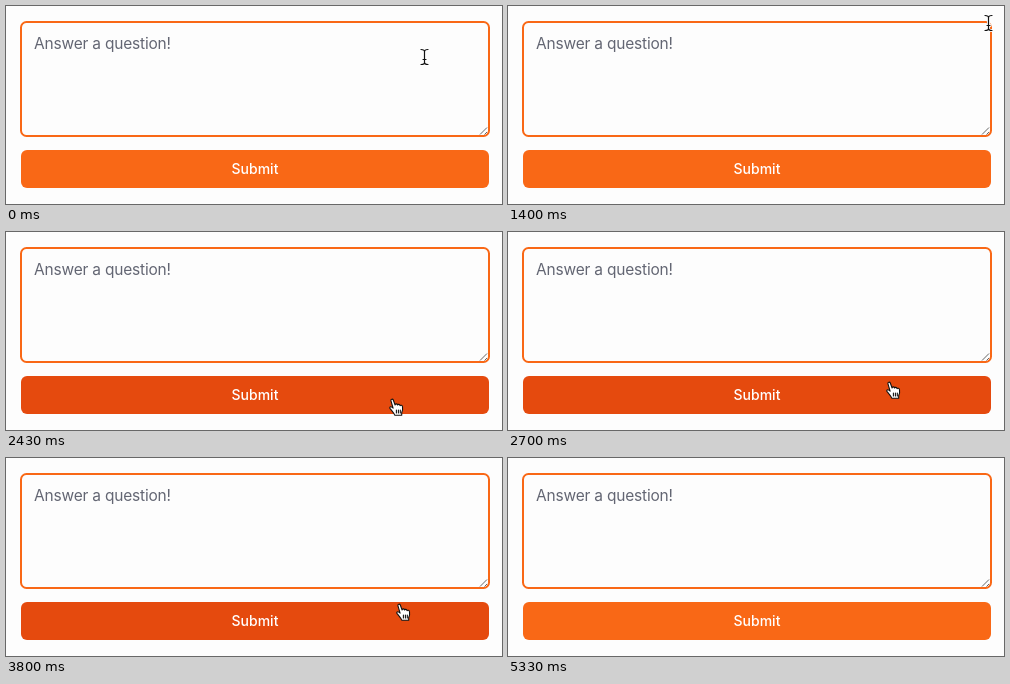
An HTML page that plays this animation: 496 px wide and 198 px high, repeating every 5410 ms.

```html
<!DOCTYPE html>
<html lang="en">
<head>
<meta charset="utf-8">
<title>Answer form</title>
<style>
  html, body { margin: 0; width: 100%; height: 100%; overflow: hidden; background: #fdfdfd; }
  svg { display: block; }
  text { font-family: Inter, "Open Sans", sans-serif; }
</style>
</head>
<body>
<svg width="496" height="198" viewBox="0 0 496 198">
  <rect x="15" y="16" width="468" height="114" rx="5.5" fill="#fdfdfd" stroke="#f96816" stroke-width="2"/>
  <path d="M474 128.5l7-7M478.5 128.5l2.5-2.5" stroke="#555" stroke-width=".9"/>
  <text x="28" y="43" font-size="15.5" letter-spacing="-.2" fill="#636673">Answer a question!</text>
  <rect id="caret" x="28" y="28" width="1" height="18" fill="#111"/>
  <rect id="button" x="15" y="144" width="468" height="38" rx="6"/>
  <text x="249" y="168" font-size="14" font-weight="500" text-anchor="middle" fill="#fff">Submit</text>
  <g id="pointer" stroke-linejoin="round" stroke-linecap="round">
    <g id="beam" fill="none">
      <path id="stem" d="M-3.5-7.5Q0-7.5 0-5.5Q0-7.5 3.5-7.5M0-5.5V5.5M-3.5 7.5Q0 7.5 0 5.5Q0 7.5 3.5 7.5M-1.5 2.5H1.5" stroke="#fff" stroke-width="2.6"/>
      <use href="#stem"/>
      <path d="M-3.5-7.5Q0-7.5 0-5.5Q0-7.5 3.5-7.5M0-5.5V5.5M-3.5 7.5Q0 7.5 0 5.5Q0 7.5 3.5 7.5M-1.5 2.5H1.5" stroke="#111" stroke-width="1.2"/>
    </g>
    <path id="hand" fill="#fff" stroke="#111" stroke-width="1.1"
      d="M-1.6.6C-1.9-1 .2-1.4.8 0L2.6 5C2.6 3.6 4.6 3.5 5.1 5C5.4 4 7.2 4.2 7.6 5.6C8.2 4.9 9.8 5.2 10 6.8C10.4 9.4 10.2 11 9.2 12.6V15.2H2.2C1.6 13-.6 11-2.4 8.6C-3.4 7.2-1.8 6.2-.6 7.2L.6 8.2ZM3.9 10V13M5.9 10V13M7.8 10V13"/>
    <path id="arrow" fill="#111" stroke="#fff" d="M0 0V13.5L3.1 10.7L5.2 15.4L7.5 14.4L5.4 9.8H9.6Z"/>
  </g>
</svg>
<script>
const LOOP = 5410, EXIT = 4400;
const $ = id => document.getElementById(id);

// Hotspot of the mouse: [ms, x, y]
const route = [
  [0, 418, 51], [30, 418, 51], [570, 459, 27], [730, 469, 17],
  [1100, 480, 17], [1400, 480, 17], [1670, 434, 88], [1810, 434, 88],
  [2370, 390, 164], [2480, 384, 170], [2700, 381, 151], [2930, 384, 110],
  [3100, 385, 107], [3350, 388, 156], [3480, 391, 170], [3560, 392, 165],
  [3800, 393, 147], [4070, 440, 110], [4310, 440, 110], [EXIT, 498, 98]
];

const slope = (i, axis) =>
  (route[i + 1][axis] - route[i][axis]) / (route[i + 1][0] - route[i][0]);

// Speed at a point; zero at rests and turning points
function speed(i, axis) {
  if (i === 0 || i === route.length - 1) return 0;
  const a = slope(i - 1, axis), b = slope(i, axis);
  return a * b > 0 ? 2 * a * b / (a + b) : 0;
}

function position(t, axis) {
  const i = route.findIndex((p, n) => n < route.length - 1 && t < route[n + 1][0]);
  const [p, q] = [route[i], route[i + 1]];
  const span = q[0] - p[0], u = (t - p[0]) / span, v = 1 - u;
  return v * v * (1 + 2 * u) * p[axis] + u * u * (3 - 2 * u) * q[axis]
    + span * u * v * (v * speed(i, axis) - u * speed(i + 1, axis));
}

const show = (id, on) => $(id).setAttribute("visibility", on ? "visible" : "hidden");

function draw(t) {
  const present = t < EXIT;
  const x = present ? position(t, 1) : 0, y = present ? position(t, 2) : 0;
  const onField = present && x < 484 && y >= 15 && y < 131;
  const onButton = present && x < 483 && y >= 144 && y < 182;

  show("caret", (t >= 600 && t < 1100) || (t >= 1830 && (t - 1830) % 1000 < 500));
  show("beam", onField);
  show("hand", onButton);
  show("arrow", present && !onField && !onButton);
  $("button").setAttribute("fill", onButton ? "#e54a0e" : "#f96816");
  $("pointer").setAttribute("transform", `translate(${Math.round(x) + .5} ${Math.round(y)})`);
}

const start = performance.now();
function tick() {
  draw((performance.now() - start) % LOOP);
  requestAnimationFrame(tick);
}
tick();
</script>
</body>
</html>
```
